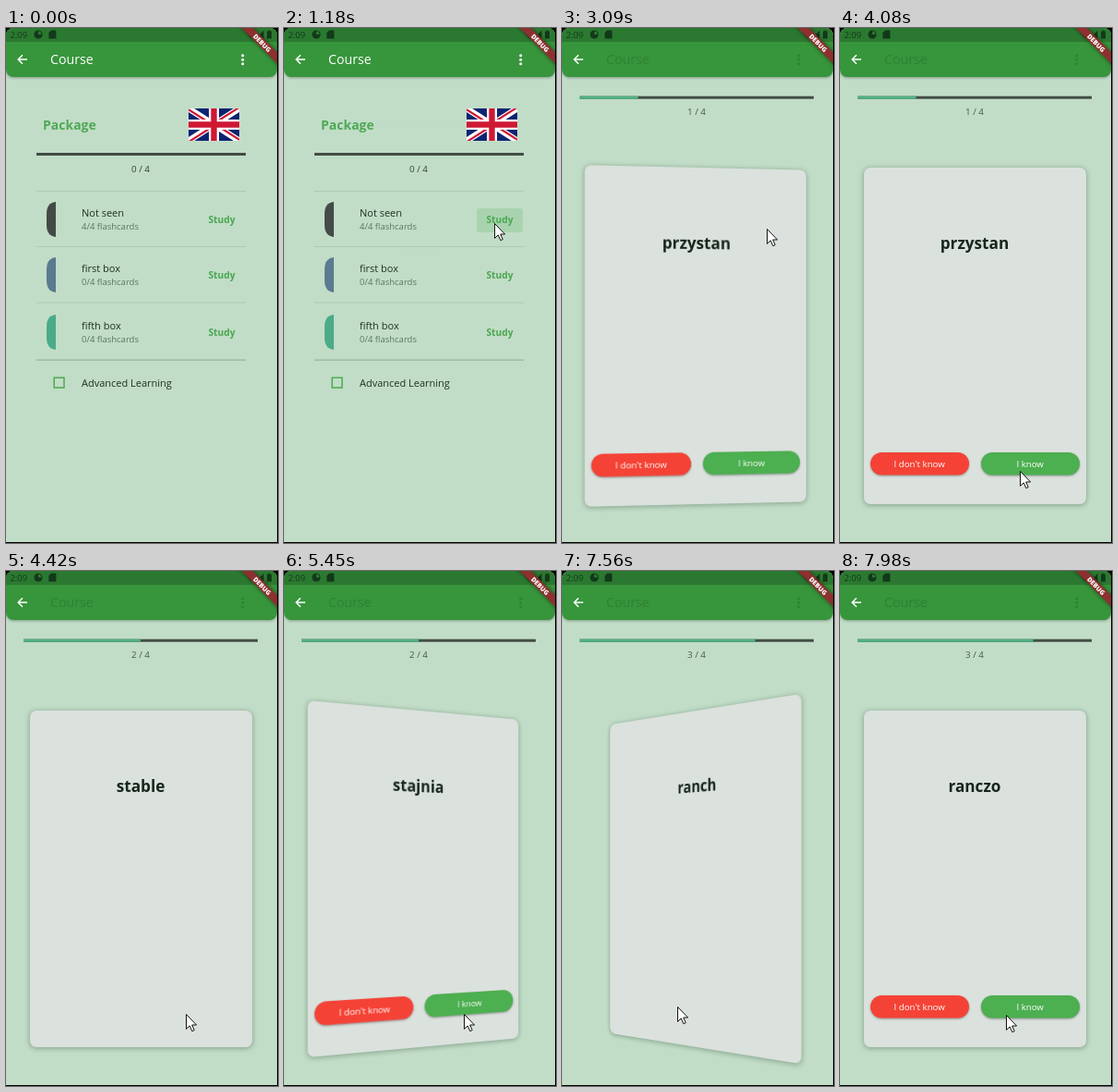
Write an HTML page that moves like this. It is 295x557 px and loops after 8000 ms.

```html
<!DOCTYPE html>
<html lang="en">
<head>
<meta charset="utf-8">
<title>Flashcards</title>
<style>
html, body { margin: 0; width: 100%; height: 100%; overflow: hidden; background: #000; }
#stage { position: relative; width: 295px; height: 557px; overflow: hidden; background: #000; }
#screen { position: absolute; left: 0; top: 0; width: 294px; height: 556px; overflow: hidden; background: #c1ddc7; border-radius: 8px 8px 0 0; }
svg { position: absolute; left: 0; top: 0; display: block; overflow: visible; }
text { font-family: "Open Sans", "Noto Sans", sans-serif; }
#pages { position: absolute; left: 0; top: 0; width: 295px; height: 557px; transform-origin: 147px 290px; }
.page { position: absolute; left: 0; top: 0; width: 295px; height: 557px; }
.card { position: absolute; left: 26px; top: 151px; width: 241px; height: 364px; border-radius: 7px; background: #dbe1dd; box-shadow: 0 1px 5px 1px rgba(40, 70, 50, .32); }
.word { font-size: 17.2px; font-weight: 700; fill: #16261b; text-anchor: middle; }
.count { font-size: 9.8px; fill: #45584a; text-anchor: middle; }
.btn { filter: drop-shadow(0 1.2px 1px rgba(0, 0, 0, .35)); }
.label { font-size: 9.7px; fill: #fff; text-anchor: middle; }
.name { font-size: 11px; fill: #1e3023; }
.sub { font-size: 9.5px; fill: #5b7462; }
.study { font-size: 10.2px; font-weight: 700; fill: #49a650; text-anchor: middle; }
#bar { filter: drop-shadow(0 1px 1.5px rgba(0, 0, 0, .3)); }
</style>
</head>
<body>
<div id="stage">
  <div id="screen">
    <svg id="home" width="295" height="557">
      <text x="40" y="109.5" font-size="14" font-weight="700" fill="#4fa956">Package</text>
      <svg x="198" y="87" width="55" height="35" viewBox="0 0 55 35" style="overflow:hidden">
        <rect width="55" height="35" fill="#0c2470"/>
        <path d="M0 0L55 35M55 0L0 35" stroke="#fff" stroke-width="6.6"/>
        <path d="M0 1.2L27.5 18.7M55 33.8L27.5 16.3M55 -1.2L27.5 16.3M0 36.2L27.5 18.7" stroke="#cf1733" stroke-width="2.2"/>
        <path d="M27.5 0V35M0 17.5H55" stroke="#fff" stroke-width="11"/>
        <path d="M27.5 0V35M0 17.5H55" stroke="#cf1733" stroke-width="6.4"/>
      </svg>
      <rect x="33" y="135" width="227" height="3" fill="#424b45"/>
      <text class="count" x="146" y="155.5" style="fill:#2e4034">0 / 4</text>
      <g id="rows"></g>
      <rect x="33" y="358.4" width="227" height="1.4" fill="#9bb8a3"/>
      <rect x="52.2" y="378.2" width="10.8" height="10.8" fill="none" stroke="#4caa52" stroke-width="1.5"/>
      <text class="name" x="82" y="388">Advanced Learning</text>
      <clipPath id="studyClip"><rect x="209" y="195" width="50" height="26" rx="3"/></clipPath>
      <circle id="studyInk" cx="234" cy="209" r="0" fill="#4caf50" clip-path="url(#studyClip)"/>
    </svg>
    <div id="pages"></div>
    <svg width="295" height="557">
      <path id="bar" d="M0 0H294V45a8 8 0 0 1-8 8H8a8 8 0 0 1-8-8Z" fill="#37953b"/>
      <rect width="294" height="15" fill="#2b7930"/>
      <g fill="#12391a">
        <text x="4.5" y="10.6" font-size="9.4" fill="#12391a">2:09</text>
        <circle cx="35" cy="7" r="4.6"/>
        <path d="M35 7V3.6A3.4 3.4 0 0 1 38.4 7Z" fill="#2b7930"/>
        <path d="M49 2.6H54.4V11.6H46.4V5.2Z"/>
        <path d="M260 4.2Q266 .8 272 4.2L266 11.4Z"/>
        <path d="M279.500 2.600V11.400H271Z"/>
        <path d="M283 3.600H284.600V2.400H286.400V3.600H288V11.600H283Z"/>
      </g>
      <path d="M23 34H13.400M17.900 29.300L13.200 34L17.900 38.700" fill="none" stroke="#fff" stroke-width="1.5"/>
      <g id="title">
        <text x="48" y="39" font-size="14.2">Course</text>
        <circle cx="256.700" cy="29.800" r="1.500"/>
        <circle cx="256.700" cy="34.300" r="1.500"/>
        <circle cx="256.700" cy="38.800" r="1.500"/>
      </g>
      <g transform="translate(294 0) rotate(45)">
        <rect x="-42" y="18.500" width="84" height="8.700" fill="#8e302f" style="filter:drop-shadow(0 0 2px rgba(0,0,0,.5))"/>
        <text x="0" y="25.500" font-size="7" font-weight="800" fill="#fff" text-anchor="middle">DEBUG</text>
      </g>
    </svg>
  </div>
  <svg width="295" height="557">
    <path id="cursor" d="M.5 .5V16.400L4.200 12.900L6.800 18.700L9.200 17.600L6.700 12H11.600Z" fill="#fff" stroke="#111" stroke-width="1"/>
  </svg>
</div>
<script>
const LOOP = 8000, WIDTH = 295, FLIP = 550, SLIDE = 210;
const $ = id => document.getElementById(id);
const clamp = v => Math.max(0, Math.min(1, v));
const span = (t, start, length) => clamp((t - start) / length);

// Cubic Bezier easing, solved for x by bisection
function bezier(x1, y1, x2, y2) {
  const at = (a, b, u) => 3 * (1 - u) * (1 - u) * u * a + 3 * (1 - u) * u * u * b + u * u * u;
  return x => {
    if (x <= 0 || x >= 1) return clamp(x);
    let lo = 0, hi = 1;
    for (let i = 0; i < 24; i++) {
      const mid = (lo + hi) / 2;
      if (at(x1, x2, mid) < x) lo = mid; else hi = mid;
    }
    return at(y1, y2, lo);
  };
}
const easeIn = bezier(.42, 0, 1, 1);
const easeOut = bezier(0, 0, .58, 1);
const easeInOut = bezier(.42, 0, .58, 1);

const rows = [
  ['Not seen', '4/4', 207, '#444a47'],
  ['first box', '0/4', 267, '#5a7a90'],
  ['fifth box', '0/4', 329, '#4bab88']
];
$('rows').innerHTML = rows.map(([name, count, y, color], i) => `
  <rect x="33" y="${[176, 236, 296.5][i]}" width="227" height="1" fill="#aecab5"/>
  <path d="M54 ${y - 19}Q44 ${y - 18} 44 ${y - 6}V${y + 6}Q44 ${y + 18} 54 ${y + 19}Z" fill="${color}"/>
  <text class="name" x="82" y="${y - 3}">${name}</text>
  <text class="sub" x="82" y="${y + 11}">${count} flashcards</text>
  <text class="study" x="234" y="${y + 4}">Study</text>`).join('');

// flip and slide are start times; tap is where the pressed button is touched
const cards = [
  { front: 'marina', back: 'przystan', flip: 2592, slide: 4205, tap: [195, 479], button: 153 },
  { front: 'stable', back: 'stajnia', flip: 5010, slide: 6440, tap: [138, 471], button: 33 },
  { front: 'ranch', back: 'ranczo', flip: 7415 }
];

const button = (x, color, label) => `
  <rect class="btn" x="${x}" y="459" width="107" height="24.500" rx="12.250" fill="${color}"/>
  <text class="label" x="${x + 53.2}" y="474.700">${label}</text>`;

cards.forEach((card, i) => {
  const page = document.createElement('div');
  page.className = 'page';
  const ink = card.tap ? `
    <clipPath id="clip${i}"><rect x="${card.button}" y="459" width="107" height="24.500" rx="12.250"/></clipPath>
    <circle class="ink" cx="${card.tap[0]}" cy="${card.tap[1]}" r="0" fill="#fff" fill-opacity=".17" clip-path="url(#clip${i})"/>` : '';
  page.innerHTML = `
    <svg width="295" height="120">
      <rect x="19" y="73.700" width="254" height="3" fill="#424d45"/>
      <rect x="19" y="73.700" width="${63.5 * (i + 1)}" height="3" fill="#50b185"/>
      <text class="count" x="146" y="93.800">${i + 1} / 4</text>
    </svg>
    <div class="card"><svg width="241" height="364" viewBox="26 151 241 364">
      <text class="word" x="146" y="238.600"></text>
      <g class="answers">${button(33, '#f44336', "I don't know")}${button(153, '#4caf50', 'I know')}${ink}</g>
    </svg></div>`;
  $('pages').append(page);
  const find = name => page.querySelector(name);
  Object.assign(card, { page, box: find('.card'), word: find('.word'), answers: find('.answers'), ink: find('.ink') });
});

// Pointer stops: time, x, y
const path = [
  [200, 262, 560], [480, 248, 400], [780, 229, 240], [970, 228, 211], [1180, 228, 211],
  [1500, 245, 211], [1960, 245, 211], [2000, 240, 209], [2270, 222, 217], [3100, 222, 217],
  [3330, 181, 296], [3700, 179, 420], [4070, 195, 479], [5800, 195, 479],
  [6250, 125, 471], [7620, 125, 471], [7960, 180, 480]
];
function pointer(t) {
  let i = path.findIndex(p => p[0] > t);
  if (i < 0) return path[path.length - 1].slice(1);
  if (i === 0) return path[0].slice(1);
  const a = path[i - 1], b = path[i], k = (t - a[0]) / (b[0] - a[0]);
  return [a[1] + (b[1] - a[1]) * k, a[2] + (b[2] - a[2]) * k];
}

function drawCard(card, t, x) {
  const k = span(t, card.flip, FLIP), turned = k >= .5;
  const angle = turned ? 90 * (1 - easeOut(k * 2 - 1)) : -90 * easeIn(k * 2);
  card.page.style.transform = `translateX(${x}px)`;
  card.page.style.display = Math.abs(x) < WIDTH ? '' : 'none';
  card.box.style.transform = angle ? `perspective(690px) rotateY(${angle}deg)` : 'none';
  card.word.textContent = turned ? card.back : card.front;
  card.answers.style.display = turned ? '' : 'none';
  if (card.ink) card.ink.setAttribute('r', Math.max(0, t - card.slide + 70) * .7);
}

function draw(t) {
  const enter = easeOut(span(t, 1180, 300));
  $('home').style.opacity = 1 - easeOut(span(t, 1180, 200));
  $('home').style.display = enter < 1 ? '' : 'none';
  $('studyInk').setAttribute('r', 34 * span(t, 1030, 160));
  $('studyInk').setAttribute('fill-opacity', t < 1030 ? 0 : .2);
  $('title').setAttribute('fill', `rgb(${[[255, 47], [255, 130], [255, 52]].map(([a, b]) => Math.round(a + (b - a) * enter))})`);

  const pages = $('pages').style;
  pages.display = enter > 0 ? '' : 'none';
  pages.opacity = enter;
  pages.transform = enter < 1 ? `scale(${.85 + .15 * enter})` : 'none';
  const pos = easeInOut(span(t, cards[0].slide, SLIDE)) + easeInOut(span(t, cards[1].slide, SLIDE));
  cards.forEach((card, i) => drawCard(card, t, (i - pos) * WIDTH));

  $('cursor').setAttribute('transform', `translate(${pointer(t)})`);
}

const begin = performance.now();
function tick() {
  draw((performance.now() - begin) % LOOP);
  requestAnimationFrame(tick);
}
tick();
</script>
</body>
</html>
```
